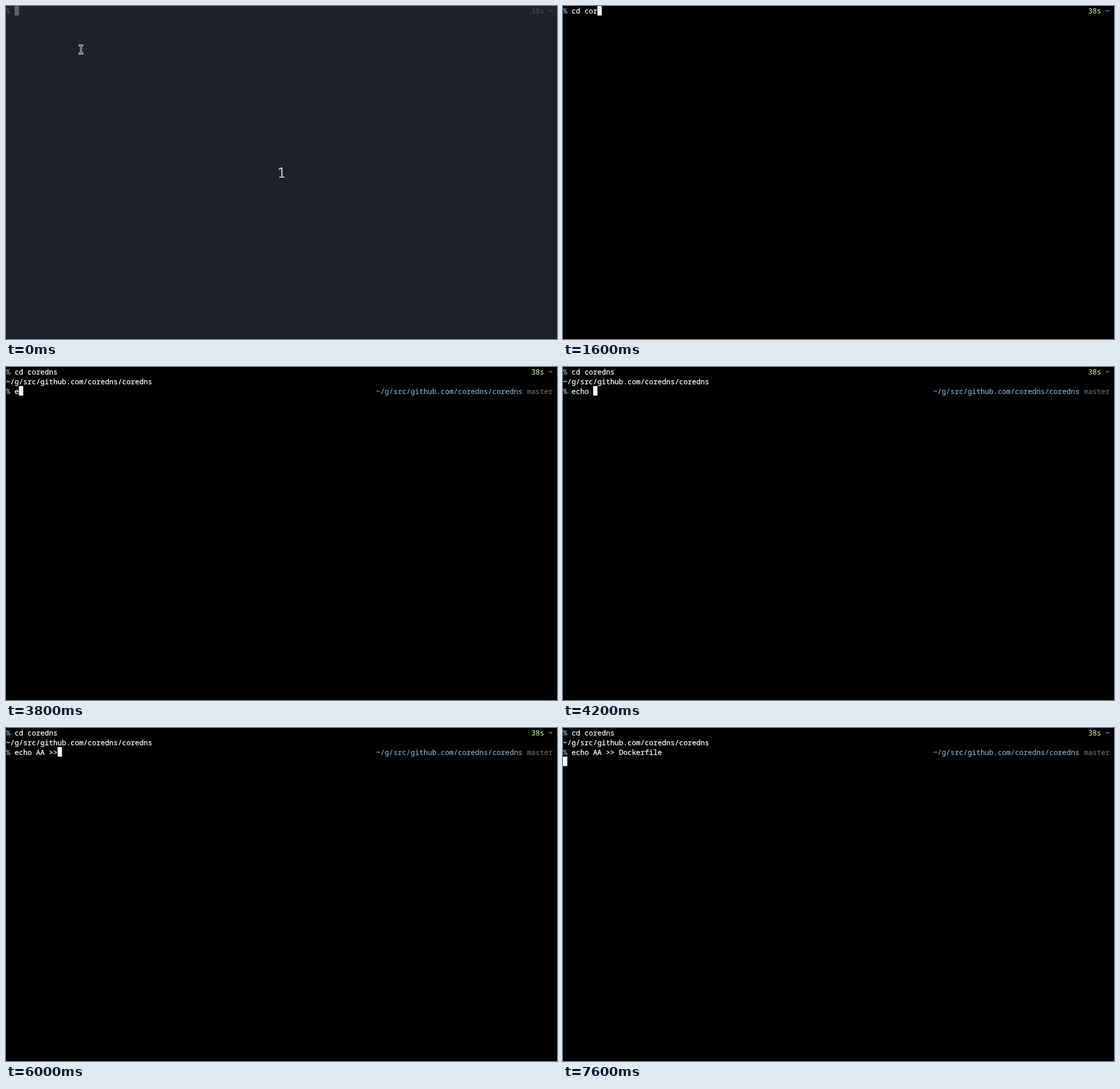
Recreate the animation shown at these times as an HTML page. Size 962 px wide and 582 px high, loop 8 s.

```html
<!DOCTYPE html>
<html lang="en">
<head>
<meta charset="utf-8">
<title>Terminal session</title>
<style>
  html, body { margin: 0; width: 100%; height: 100%; overflow: hidden; background: #000; }
  svg { display: block; width: 962px; height: 582px; }
  text {
    font: 12.526px "Noto Sans Mono", "DejaVu Sans Mono", monospace;
    white-space: pre;
    text-rendering: geometricPrecision;
  }
</style>
</head>
<body>
<svg id="stage" viewBox="0 0 962 582"></svg>
<script>
const LOOP = 8000, STEP = 100, KEY_TIME = 40;
const CELL = 962 / 128, ROW = 16.65, RIGHT_COLUMN = 127;
const PATH = "~/g/src/github.com/coredns/coredns";
const BLUE = "#84a5c6", GREEN = "#b5d68a", GRAY = "#666", WHITE = "#fff";

// Bursts of typing: the moment of the first key, then one key per KEY_TIME.
const TYPING = [
  [520, "cd "], [900, "c"], [1500, "or"], [1750, "ed"], [1950, "ns"], [2300, "\n"],
  [3800, "e"], [4080, "cho "], [4600, "AA"], [4900, " "],
  [5800, ">"], [6000, "> "], [6300, "Do"], [6600, "cke"], [7000, "rfile"], [7600, "\n"]
];

const stage = document.getElementById("stage");

const text = (column, row, string, color) =>
  `<text x="${column * CELL}" y="${row * ROW + 13.25}" fill="${color}"
    stroke="${color}" stroke-width=".25">${string}</text>`;

const cursor = (column, row, color = WHITE) =>
  `<rect x="${column * CELL}" y="${row * ROW}" width="${CELL}" height="${ROW}" fill="${color}"/>`;

const background = (color, edge) =>
  `<rect width="962" height="582" fill="${edge}"/><rect width="962" height="580" fill="${color}"/>`;

function pointer() {
  const beam = "M128.5 69H130L131 70L132 69H133.5M131 70V82M128.5 83H130L131 82L132 83H133.5";
  return `<g fill="none" stroke-linecap="square">
    <path d="${beam}" stroke="#fff" stroke-width="2.8"/>
    <path d="${beam}" stroke="#000" stroke-width="1"/></g>`;
}

const typedAt = time => TYPING.map(([start, keys]) =>
  keys.slice(0, Math.max(0, Math.floor((time - start) / KEY_TIME) + 1))).join("");

function countdown() {
  return background("#1e2128", "#17191e")
    + text(0, 0, "%", "#4b5058")
    + cursor(2, 0, "#606163")
    + text(RIGHT_COLUMN - 5, 0, "38s ~", "#484c4e")
    + `<text x="481" y="299.5" text-anchor="middle" fill="#d0d1d2" style="font-size:25px">1</text>`
    + pointer();
}

function terminal(time) {
  const [first, second, afterSecond] = typedAt(time).split("\n");
  let picture = background("#000", "#000")
    + text(0, 0, "%", BLUE)
    + text(2, 0, first, WHITE)
    + text(RIGHT_COLUMN - 5, 0, "38s", GREEN)
    + text(RIGHT_COLUMN - 1, 0, "~", BLUE);

  if (!first) picture += pointer();
  if (second === undefined) return picture + cursor(2 + first.length, 0);

  // The shell answers one step after Enter.
  if (!typedAt(time - STEP).includes("\n")) return picture + cursor(0, 1);

  picture += text(0, 1, PATH, WHITE)
    + text(0, 2, "%", BLUE)
    + text(2, 2, second, WHITE)
    + text(RIGHT_COLUMN - 7 - PATH.length, 2, PATH, BLUE)
    + text(RIGHT_COLUMN - 6, 2, "master", GRAY);
  return picture + (afterSecond === undefined ? cursor(2 + second.length, 2) : cursor(0, 3));
}

let shown = "";
function render() {
  const time = Math.floor(performance.now() % LOOP / STEP) * STEP;
  const picture = time < 500 ? countdown() : terminal(time);
  if (picture !== shown) stage.innerHTML = shown = picture;
  requestAnimationFrame(render);
}
render();
</script>
</body>
</html>
```
